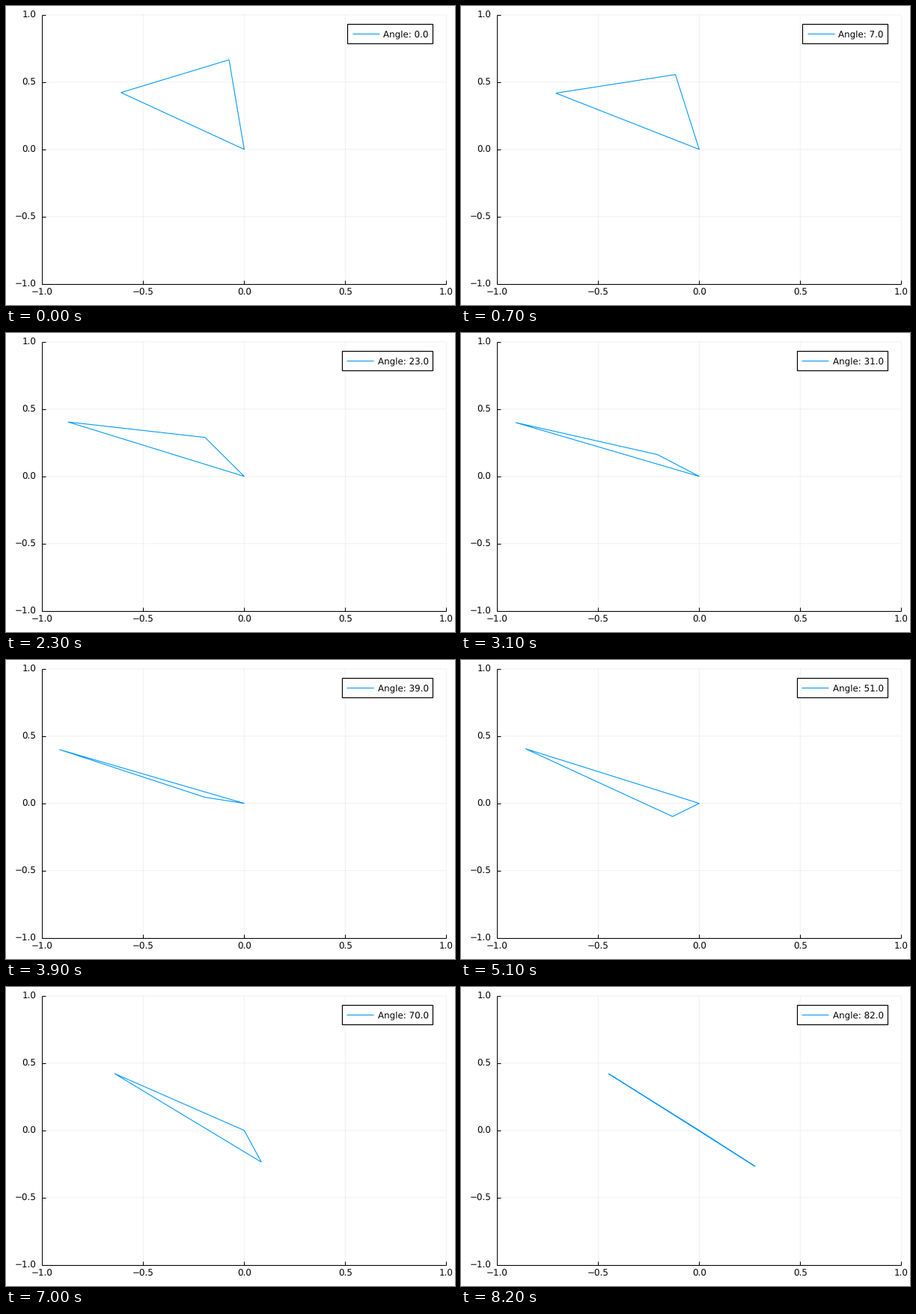
A matplotlib script that plays this animation: 600 by 400 pixels, repeating every 8300 ms.

```python
import matplotlib.pyplot as plt
import numpy as np
from matplotlib.animation import FuncAnimation
from matplotlib.patches import Rectangle

W, H, DPI = 600, 400, 100
FRAMES, INTERVAL = 83, 100
PX = 72 / DPI                      # one pixel in points
BLUE = "#009afa"
LEFT, RIGHT, TOP, BOTTOM = 48.3, 588.3, 11.9, 371.7
TICKS = np.linspace(-1, 1, 5)

plt.rcParams["font.family"] = "DejaVu Sans"
plt.rcParams["font.size"] = 11.9 * PX
plt.rcParams["text.hinting"] = "none"

fig = plt.figure(figsize=(W / DPI, H / DPI), dpi=DPI, facecolor="white")
ax = fig.add_axes([0, 0, 1, 1])
ax.set_xlim(0, W)
ax.set_ylim(H, 0)
ax.axis("off")


def sx(x):
    return LEFT + (x + 1) / 2 * (RIGHT - LEFT)


def sy(y):
    return BOTTOM - (y + 1) / 2 * (BOTTOM - TOP)


def stroke(xs, ys, color="black", width=1.0, **kw):
    return ax.plot(xs, ys, color=color, lw=width * PX,
                   solid_capstyle="butt", solid_joinstyle="miter", **kw)[0]


def tick_label(value):
    return f"{value:.1f}".replace("-", "\u2212")


# Grid, ticks and labels
grid = dict(alpha=0.06, snap=False, zorder=1)
for v in TICKS:
    stroke([sx(v)] * 2, [TOP, BOTTOM], **grid)
    stroke([LEFT, RIGHT], [sy(v)] * 2, **grid)
    stroke([sx(v)] * 2, [BOTTOM, BOTTOM - 5], zorder=2)
    stroke([LEFT, LEFT + 5], [sy(v)] * 2, zorder=2)
    ax.text(sx(v), 387, tick_label(v), ha="center", va="baseline")
    ax.text(40.5, sy(v) + 4.3, tick_label(v), ha="right", va="baseline")
stroke([LEFT, LEFT], [TOP, BOTTOM], zorder=2)
stroke([LEFT, RIGHT], [BOTTOM, BOTTOM], zorder=2)

# Key poses: angle, far corner, near corner; a quartic runs through them
POSES = np.array([
    (0, -0.610, 0.4225, -0.075, 0.666),
    (14, -0.793, 0.412, -0.157, 0.440),
    (39, -0.914, 0.400, -0.196, 0.046),
    (70, -0.642, 0.4225, 0.085, -0.236),
    (82, -0.448, 0.421, 0.277, -0.268),
])
END = FRAMES - 1
CURVES = np.polyfit(POSES[:, 0] / END, POSES[:, 1:], 4)


def corners(angle):
    """Far and near corner of the triangle at an angle."""
    far_x, far_y, near_x, near_y = (np.polyval(c, angle / END)
                                    for c in CURVES.T)
    return (far_x, far_y), (near_x, near_y)


triangle = stroke([], [], BLUE, 1.1, zorder=3)

# Legend, growing to the left with its text
BOX_RIGHT, DIGIT = 570.2, 7.6
box = ax.add_patch(Rectangle((0, 23.8), 1, 26, facecolor="white",
                             edgecolor="black", lw=1.2 * PX, zorder=4))
key = stroke([], [], BLUE, 1.1, zorder=5)
label = ax.text(0, 41, "", ha="left", va="baseline", zorder=5)


def update(n):
    far, near = corners(n)
    xs, ys = np.array([(0, 0), near, far, (0, 0)]).T
    triangle.set_data(sx(xs), sy(ys))

    text = f"Angle: {n:.1f}"
    left = BOX_RIGHT - 37.4 - DIGIT * (len(text) - 0.0) + 7.2
    left = BOX_RIGHT - 113.8 - DIGIT * (len(text) - len("Angle: 0.0"))
    box.set_x(left)
    box.set_width(BOX_RIGHT - left)
    key.set_data([left + 6.2, left + 42.2], [36.8, 36.8])
    label.set_x(left + 47.8)
    label.set_text(text)
    return triangle, box, key, label


anim = FuncAnimation(fig, update, frames=FRAMES, interval=INTERVAL,
                     repeat=True, repeat_delay=0)
plt.show()
```
